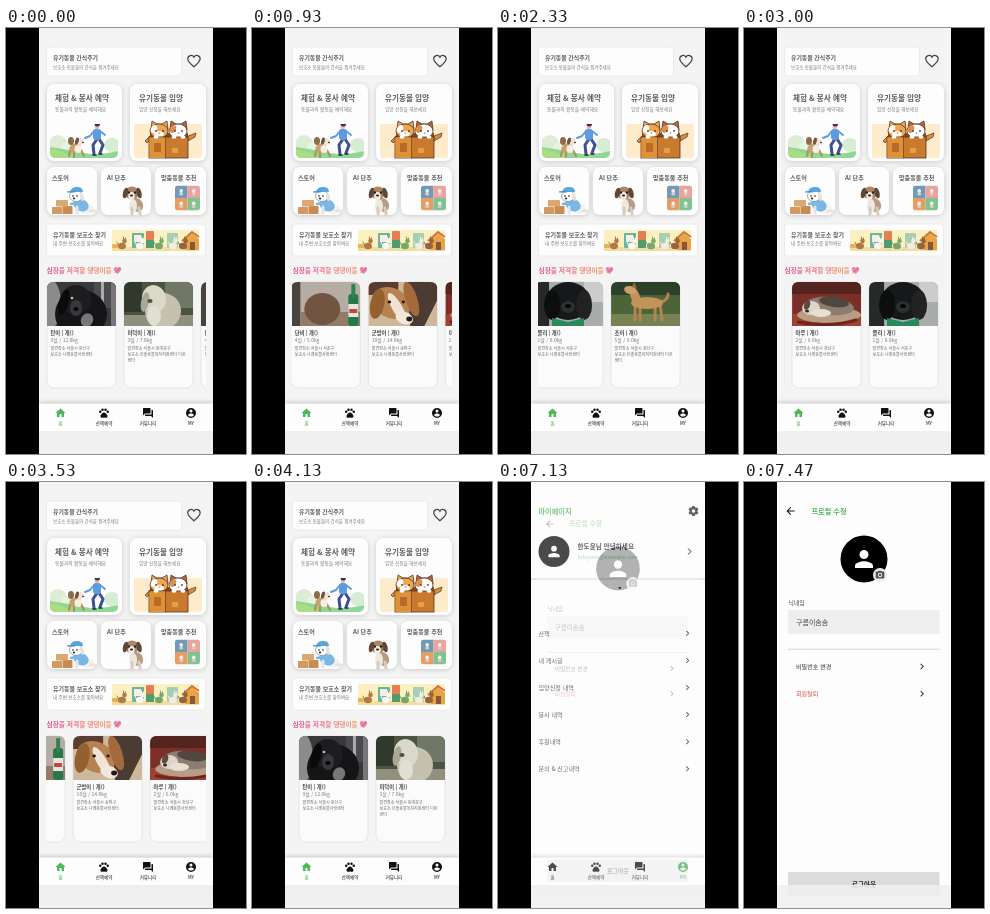
Write an HTML page that moves like this. It is 240 by 426 pixels and loops after 8000 ms.

```html
<!DOCTYPE html>
<html lang="ko">
<head>
<meta charset="utf-8">
<style>
  html, body { margin: 0; width: 100%; height: 100%; overflow: hidden; background: #000; }
  svg { display: block; width: 100%; height: 100%; }
  text { font-family: "Noto Sans CJK KR", "Noto Sans CJK", "Noto Sans", sans-serif; white-space: pre; }
  .card { fill: #fdfdfd; filter: drop-shadow(0 1px 2.5px rgba(0,0,0,.17)); }
  .field { fill: #fdfdfd; stroke: #e6e6e6; stroke-width: .7; }
</style>
</head>
<body>
<svg id="stage" viewBox="0 0 240 426"></svg>
<script>
const GREEN = '#4db85a', INK = '#333', SOFT = '#5c5c5c', PALE = '#7c7c7c';

const text = (x, y, size, str, fill = INK, weight = 400, anchor = 'start') =>
  `<text x="${x}" y="${y}" font-size="${size}" fill="${fill}" font-weight="${weight}" text-anchor="${anchor}">${str}</text>`;
const rect = (x, y, w, h, fill, r = 0, extra = '') =>
  `<rect x="${x}" y="${y}" width="${w}" height="${h}" rx="${r}" fill="${fill}" ${extra}/>`;
const oval = (x, y, rx, ry, fill, turn = 0) =>
  `<ellipse cx="${x}" cy="${y}" rx="${rx}" ry="${ry}" fill="${fill}" transform="rotate(${turn} ${x} ${y})"/>`;
const path = (d, fill, extra = '') => `<path d="${d}" fill="${fill}" ${extra}/>`;
const line = (d, color, width) => path(d, 'none', `stroke="${color}" stroke-width="${width}" stroke-linecap="round" stroke-linejoin="round"`);
const panel = (x, y, w, h, r, kind = 'card') => rect(x, y, w, h, '#fff', r, `class="${kind}"`);
const group = (body, extra = '') => `<g ${extra}>${body}</g>`;
const icon = (name, cx, cy, size, fill) =>
  path(ICONS[name], fill, `transform="translate(${cx - size / 2} ${cy - size / 2}) scale(${size / 24})"`);

// 24-unit icon outlines
const dot = (x, y, r) => `M${x - r} ${y}a${r} ${r} 0 1 0 ${2 * r} 0a${r} ${r} 0 1 0 ${-2 * r} 0z`;
const ICONS = {
  home: 'M10 20v-6h4v6h5v-8h3L12 3 2 12h3v8z',
  paw: dot(4.5, 9.5, 2.5) + dot(9, 5.5, 2.5) + dot(15, 5.5, 2.5) + dot(19.5, 9.5, 2.5) +
    'M12 11c-3 0-7 5-7 7.5c0 3 3 3.5 7 2.5c4 1 7 .5 7-2.5c0-2.5-4-7.5-7-7.5z',
  chat: 'M21 6h-2v9H6v2c0 .55.45 1 1 1h11l4 4V7c0-.55-.45-1-1-1zM17 12V3c0-.55-.45-1-1-1H3c-.55 0-1 .45-1 1v14l4-4h10c.55 0 1-.45 1-1z',
  account: 'M12 2a10 10 0 1 0 0 20 10 10 0 0 0 0-20zm0 3a3 3 0 1 1 0 6 3 3 0 0 1 0-6zm0 14.2c-2.5 0-4.71-1.28-6-3.22.03-1.99 4-3.08 6-3.08s5.97 1.09 6 3.08c-1.29 1.94-3.5 3.22-6 3.22z',
  person: 'M12 12a4 4 0 1 0 0-8 4 4 0 0 0 0 8zm0 2c-2.67 0-8 1.34-8 4v2h16v-2c0-2.66-5.33-4-8-4z',
  next: 'M10 6 8.59 7.41 13.17 12l-4.58 4.59L10 18l6-6z',
  back: 'M20 11H7.83l5.59-5.59L12 4l-8 8 8 8 1.41-1.41L7.83 13H20z',
  camera: 'M9 2 7.17 4H4c-1.1 0-2 .9-2 2v12c0 1.1.9 2 2 2h16c1.1 0 2-.9 2-2V6c0-1.1-.9-2-2-2h-3.17L15 2zm3 15a5 5 0 1 1 0-10 5 5 0 0 1 0 10zm0-2a3 3 0 1 0 0-6 3 3 0 0 0 0 6z',
  heart: 'M12 21C5 15 2 12 2 8a5.3 5.3 0 0 1 10-2.5A5.3 5.3 0 0 1 22 8c0 4-3 7-10 13z'
};

function gear(cx, cy) {
  const teeth = [0, 60, 120].map(a => rect(cx - 1.4, cy - 5, 2.8, 10, '#222', .5, `transform="rotate(${a} ${cx} ${cy})"`));
  return teeth.join('') + oval(cx, cy, 3.9, 3.9, '#222') + oval(cx, cy, 1.7, 1.7, '#fdfdfd');
}

function nav(active) {
  const tabs = [['home', '홈', 54.5], ['paw', '산책예약', 98], ['chat', '커뮤니티', 142], ['account', 'MY', 185]];
  return rect(33, 375.5, 174, 28, '#fdfdfd', 0, 'style="filter:drop-shadow(0 -1px 2px rgba(0,0,0,.2))"') +
    tabs.map(([name, label, x], i) => {
      const color = i === active ? GREEN : '#111';
      return icon(name, x, 385, 12, color) + text(x, 397, i === active ? 5 : 4.5, label, color, 500, 'middle');
    }).join('');
}

const walkArt = () =>
  rect(44, 96, 68, 34, '#fdfdfd') + oval(52, 116, 9, 9, '#dcedd4') + oval(62, 119, 7, 5, '#e8f3e0') +
  oval(106, 117, 8, 7, '#d6ecd3') + path('M44 119q20 3 34 6t34-2v8H44z', '#8fd893') + path('M44 121q14 2 24 9H44z', '#a9dd84') +
  line('M64 123l-1 5M68 124l0 5M75 122l3 6', '#b98a55', 2) + oval(69, 120, 6, 4.5, '#c8a06d', -25) + oval(72, 121, 3.5, 4, '#f4eee4') +
  oval(65, 113, 3, 4, '#8d6a48') + oval(74, 113.5, 4, 3.6, '#f0e5d2') + oval(71, 113, 1.8, 3.5, '#74553c', 15) + oval(77, 114.5, 1, .8, INK) +
  line('M91 111l-4 6 1 9M93 111l4 6-3 8', '#3f4f96', 3) + line('M87 127h3M93 126h3', '#2f2f55', 1.6) +
  rect(87, 101, 8, 11, '#5b9be0', 3) + line('M88 103l-4 5-5 2M94 103l5 4', '#5b9be0', 2) +
  oval(91, 98.5, 2.3, 2.6, '#efb493') + oval(91.3, 96.8, 2.7, 1.7, '#3a3350');

const cat = (x, y, coat, ear, patch) =>
  path(`M${x - 8} ${y}l1-9 5 3h5l5-3 1 9z`, ear, 'stroke="#51352c" stroke-width=".8"') +
  `<ellipse cx="${x}" cy="${y + 1}" rx="9" ry="7" fill="${coat}" stroke="#51352c" stroke-width=".8"/>` +
  oval(x - 5, y - 1, 3, 4, patch, 25) + oval(x, y + 4, 5, 3, '#fff') +
  oval(x - 3, y + 1, .8, 1, '#41291f') + oval(x + 4, y + 1, .8, 1, '#41291f') + oval(x + .5, y + 3, 1, .7, '#d87a78');

const adoptArt = () =>
  rect(128, 96, 68, 34, '#fdebcb', 3) + rect(144, 105, 38, 8, '#7d4a22') +
  cat(153, 102, '#f3a54d', '#f3a54d', '#fff') + cat(172, 102, '#fff', '#b3683a', '#dc8e4c') +
  path('M144 108l-5 5 2 2 3-3zM182 108l8-3-1 4-7 4z', '#d98d3b', 'stroke="#54342a" stroke-width=".7"') +
  rect(143, 109, 39, 21, '#c97a2d', 0, 'stroke="#54342a" stroke-width=".8"') + rect(143.4, 109.4, 16, 20.6, '#dd9238') +
  rect(148, 115, 7, 9, '#b96a2a', 1) + rect(166, 120, 6, 5, '#e2a04b', 1) + line('M159.5 109v21', '#54342a', .6) +
  oval(150, 109, 2.5, 1.8, '#fff') + oval(168, 109, 2.5, 1.8, '#fff') + oval(177, 109, 2.5, 1.8, '#fff');

const storeArt = () =>
  oval(81, 181, 7, 5, '#f5f2ee') + oval(75, 177, 8, 6, '#79b8e6', 25) + line('M71 179v6M84 183h5', '#e8e4df', 3) +
  `<ellipse cx="70" cy="168" rx="6.5" ry="5.5" fill="#fff" stroke="#77706c" stroke-width=".6"/>` +
  oval(76, 169, 1.8, 4, '#e6e1da', -12) + path('M64 164q1-5 7-5t6 5z', '#5aa5dc') + rect(61, 163.2, 8, 1.4, '#3f86bd', .7) +
  oval(67, 168, .7, .9, INK) + oval(71, 168, .7, .9, INK) + oval(68, 170.5, 1.2, .9, INK) +
  rect(46, 179, 10, 7, '#d29a62', .6) + rect(56.5, 178, 10, 8, '#c98b50', .6) + rect(50, 172, 12, 6.6, '#dba873', .6) +
  line('M65 176l5-1', '#79b8e6', 2.5);

const puppyArt = () =>
  oval(131, 177, 6, 7, '#b59c85', -20) + oval(127, 178, 4, 7, '#efe8df') + line('M126 180v6M133 180l1 6', '#d9cbbb', 3) +
  oval(126, 165, 7, 6.5, '#a98767') + oval(119.5, 165, 2.5, 5.5, '#5f4636', 15) + oval(133, 165, 2.5, 5.5, '#5f4636', -15) +
  oval(125.5, 168, 3.2, 4, '#f3ece3') + oval(123, 164.5, 1, 1.2, '#211812') + oval(129, 164.5, 1, 1.2, '#211812') + oval(125.5, 167.5, 1.5, 1.1, '#211812');

const tilesArt = () => group(['#7199b8', '#eaa49f', '#e59d63', '#80c290'].map((fill, i) => {
  const x = 169 + i % 2 * 12.5, y = 157.5 + (i >> 1) * 12.5;
  return rect(x, y, 12.5, 12.5, fill) + oval(x + 6.2, y + 5.5, 1.8, 2, '#f4eee8') + oval(x + 6.2, y + 8.5, 2, 1.5, '#d8cfc7');
}).join(''), 'clip-path="url(#tiles)"');

const shelterArt = () =>
  rect(106, 202, 87, 21, '#fdf0c0') + rect(106, 219, 87, 4, '#f2dca0') +
  [[106, 216, 6, '#e6b456'], [126, 205, 12, '#69b5a5'], [140, 203, 8, '#e37f52'], [140, 212, 8, '#4f9c70'], [161, 205, 11, '#a4cfb4']]
    .map(([x, y, w, fill]) => rect(x, y, w, 220 - y, fill, .8)).join('') + rect(128, 207, 7, 7, '#f5f0df') +
  path('M178 213l8-8 7 6v11h-14z', '#e9a545') + path('M176 213l10-9 7 5', 'none', 'stroke="#cf743b" stroke-width="2"') + rect(184, 214, 5, 8, '#86583a') +
  [[116, '#b07a48'], [134, '#fbf7ee'], [153, '#75a86b'], [167, '#f3eddf'], [177, '#94643f']]
    .map(([x, fill]) => oval(x, 218, 4, 3.2, fill) + oval(x + 2.5, 213, 2.3, 2.3, fill) + line(`M${x - 3} 218l-2-4M${x + 1.5} 212v-3M${x + 3.5} 212v-2`, fill, 1)).join('');

// Photo stand-ins, 69 x 44
const photos = {
  black: () => rect(0, 0, 69, 44, '#39393b') + oval(4, 22, 10, 24, '#8b8b8d') + rect(47, 0, 22, 26, '#4c4c4e') +
    rect(54, 0, 3, 30, '#aaaaac') + rect(64, 0, 5, 44, '#777779') + oval(34, 32, 26, 24, '#151517') +
    oval(29, 18, 15, 15, '#1d1d1f') + oval(17, 20, 5, 13, '#0a0a0b', 15) + oval(29, 26, 6, 8, '#38383b') +
    oval(29, 27, 2.6, 2, '#060607') + oval(40, 38, 6, 7, '#77777a', 25) + oval(25, 16, 1.4, 1.2, '#bbb'),
  shaggy: () => rect(0, 0, 69, 44, '#4b5342') + rect(41, 0, 28, 26, '#717766') + rect(0, 0, 18, 30, '#30392b') + rect(0, 33, 69, 11, '#918f7d') +
    oval(39, 29, 18, 18, '#c4c2ae', 18) + oval(30, 17, 12, 14, '#dad8c8', -10) + oval(21, 20, 4, 10, '#aaa894', 12) +
    oval(26, 19, 2.6, 2, '#514e49') + oval(30, 34, 7, 10, '#e1dfd1'),
  bottle: () => rect(0, 0, 69, 44, '#b5aca3') + rect(0, 0, 9, 44, '#48433f') + rect(9, 30, 60, 14, '#927b68') + oval(31, 27, 18, 16, '#715540') +
    rect(57, 12, 10, 32, '#26784a', 3) + rect(60, 2, 4, 14, '#31824f', 1) + rect(57, 22, 10, 13, '#e9e5dc') + rect(58, 27, 8, 4, '#c5473f'),
  beagle: () => rect(0, 0, 69, 44, '#cdb89b') + rect(0, 0, 30, 13, '#5a3d30') + path('M38 0h31v18l-13 26H42z', '#4b3b33') +
    oval(23, 21, 20, 15, '#b78250', 25) + oval(9, 22, 7, 15, '#94602f', 12) + oval(43, 17, 6, 18, '#a36a3c', -18) +
    oval(29, 26, 5, 17, '#efe4d4', -30) + oval(36, 36, 9, 6, '#f1e7da', 20) + oval(41, 37, 3, 2.4, '#241c1a') +
    oval(21, 20, 1.8, 1.4, '#241812') + oval(35, 20, 1.6, 1.4, '#241812'),
  lying: () => rect(0, 0, 69, 44, '#7c2e28') + rect(0, 0, 69, 12, '#54241f') + rect(0, 32, 69, 12, '#9c4331') + oval(37, 33, 32, 8, '#b79d83') +
    oval(38, 24, 24, 9, '#8c7d70', 6) + oval(42, 20, 15, 5, '#514741', 8) + oval(19, 26, 9, 7, '#ded4c8') +
    oval(29, 31, 10, 4, '#e8dfd3') + oval(15, 23, 3, 5, '#5b4a40', 20) + oval(15, 29, 2, 1.5, '#2c2625') + line('M6 40q31 6 58-2', '#6f241f', 3),
  poodle: () => rect(0, 0, 69, 44, '#a8ada9') + rect(0, 0, 15, 44, '#252927') + rect(50, 0, 19, 20, '#cccdca') +
    oval(34, 19, 22, 19, '#171819') + oval(18, 23, 8, 15, '#0d0e0f') + oval(50, 23, 8, 15, '#202224') +
    oval(34, 25, 7, 6, '#2c2e30') + oval(34, 24, 3, 2, '#050505') + path('M18 36l16 4 16-4v8H18z', '#28895a'),
  tan: () => rect(0, 0, 69, 44, '#4b6438') + rect(0, 0, 69, 13, '#2d402a') + rect(0, 32, 69, 12, '#788154') +
    line('M24 24v14M29 25v13M44 25v13M49 22l2 16M50 20q7-2 7-8', '#b5844f', 3) + oval(36, 21, 16, 6, '#c39359') +
    oval(24, 14, 4.5, 9, '#c39359', -20) + oval(19, 8, 6, 4, '#cda069', 12) + path('M21 5l2-5 3 7z', '#9c6c3c')
};

const SHELTER = '보호소 나래동물사랑센터';
const WELFARE = ['보호소 은솔동물복지지원센터 다온', '센터'];
const dogs = [
  ['black', '탄이', '9살 / 12.0kg', '용산구', SHELTER],
  ['shaggy', '미덕이', '3살 / 7.0kg', '동대문구', ...WELFARE],
  ['bottle', '단비', '4살 / 5.0kg', '서초구', SHELTER],
  ['beagle', '군밤이', '10살 / 14.0kg', '송파구', SHELTER],
  ['lying', '마루', '2살 / 6.0kg', '강남구', SHELTER],
  ['poodle', '쫄리', '1살 / 8.0kg', '서초구', SHELTER],
  ['tan', '조이', '5살 / 9.0kg', '용산구', ...WELFARE]
];

const dogCard = ([photo, name, facts, place, shelter, rest = ''], i) => group(
  rect(0, 0, 69, 106, '#fbfbfb', 7, 'stroke="#dedede" stroke-width=".7"') +
  group(photos[photo](), 'clip-path="url(#photo)"') +
  text(3.5, 53.3, 5.3, `${name} | 개()`, '#444', 600) + text(3.5, 60.3, 5, facts, PALE) +
  [`발견장소 서울시 ${place}`, shelter, rest].map((row, n) => text(3.5, 67.5 + 6.4 * n, 4.05, row, '#666')).join(''),
  `transform="translate(${41 + 77 * i} 254)"`);

const homePage = () =>
  rect(33, 0, 174, 426, '#f4f4f4') +
  panel(40.5, 19, 135, 29, 3, 'field') + text(47, 31.6, 5.9, '유기동물 간식주기', SOFT, 600) + text(47, 40.6, 4.5, '보호소 동물들의 간식을 챙겨주세요', PALE) +
  path(ICONS.heart, 'none', 'stroke="#444" stroke-width="2" transform="translate(180.5 25.8) scale(.62)"') +
  panel(41, 56, 75, 77, 7) + text(49, 73, 7.6, '체험 &amp; 봉사 예약', SOFT, 600) + text(49, 83, 4.8, '동물과의 활동을 예약해요', PALE) +
  group(walkArt(), 'clip-path="url(#walk)"') +
  panel(124, 56, 76, 77, 7) + text(133, 73, 7.6, '유기동물 입양', SOFT, 600) + text(133, 83, 4.7, '입양 신청을 해보세요', PALE) + adoptArt() +
  [[41, 50, 46, '스토어'], [95, 50, 101, 'AI 단추'], [149, 51, 155, '맞춤동물 추천']]
    .map(([x, w, tx, label]) => panel(x, 139, w, 48, 7) + text(tx, 152, 6.1, label, SOFT, 600)).join('') +
  storeArt() + puppyArt() + tilesArt() +
  panel(40.5, 196, 159, 32, 3, 'field') + text(47, 208.6, 6, '유기동물 보호소 찾기', SOFT, 600) + text(47, 217.2, 4.6, '내 주변 보호소를 찾아봐요', PALE) + shelterArt() +
  text(40.5, 245, 6.7, '심장을 저격할 댕댕이들', 'url(#title)', 600) +
  icon('heart', 111.5, 242.5, 9, '#ee86a6') + line('M109 244.500l5-4', '#b06a92', .9) +
  group(group(dogs.map(dogCard).join(''), 'id="strip"'), 'clip-path="url(#list)"') + nav(0);

const myPage = () =>
  rect(33, 0, 174, 426, '#fdfdfd') + text(40.5, 31.5, 7.2, '마이페이지', GREEN, 700) + gear(195.5, 29) +
  oval(56, 69.5, 15.5, 15.5, '#000') + icon('person', 56, 69.5, 17, '#fff') +
  text(79.5, 66.5, 6.6, '한도윤님 안녕하세요', '#222', 700) + text(79.5, 77, 5.3, 'hdoyoon@example.com', '#8fd39b') +
  icon('next', 191.5, 69.5, 14, '#555') + rect(33, 96.5, 174, 1, '#ccc') + rect(120.5, 105, 2.5, 1.8, '#333', .8) +
  ['산책', '내 게시글', '입양신청 내역', '봉사 내역', '후원내역', '문의 &amp; 신고내역'].map((label, i) =>
    text(40.5, 153.5 + 27.1 * i, 6.1, label, INK, 500) + icon('next', 189.5, 151.3 + 27.1 * i, 11, '#222')).join('') + nav(3);

const profilePage = () =>
  rect(33, 0, 174, 426, '#fdfdfd') + icon('back', 46.5, 29, 12, '#111') + text(67.5, 31.5, 7.2, '프로필 수정', GREEN, 600) +
  oval(120, 77, 23.5, 23.5, '#000') + icon('person', 120, 77, 27, '#fff') +
  oval(136, 93, 7, 7, '#f0f0f0') + icon('camera', 136, 93, 10.5, '#555') +
  text(44.5, 122.5, 5.9, '닉네임', '#444') + rect(44, 128, 151.5, 24, '#eee') + text(52, 142.6, 7, '구름이솜솜', '#444') +
  rect(44, 166.7, 151.5, .9, '#ccc') +
  text(52, 187, 6.1, '비밀번호 변경', INK, 500) + icon('next', 178, 184.5, 12, '#333') +
  text(52, 214, 6.1, '회원탈퇴', '#dc4c4c', 500) + icon('next', 178, 211.7, 12, '#333') +
  rect(44, 390, 151.5, 24, '#dcdcdc', 1) + text(120, 404.5, 6.5, '로그아웃', '#222', 600, 'middle');

const clip = (id, x, y, w, h, r = 0) => `<clipPath id="${id}">${rect(x, y, w, h, '#000', r)}</clipPath>`;
document.getElementById('stage').innerHTML =
  `<defs>${clip('phone', 33, 0, 174, 426)}${clip('list', 40, 250, 160, 115)}${clip('walk', 44, 96, 68, 34, 5)}${clip('tiles', 169, 157.5, 25, 25, 3)}
  <clipPath id="photo"><path d="M0 44V7q0-7 7-7h55q7 0 7 7v37z"/></clipPath>
  <linearGradient id="title"><stop stop-color="#e84f98"/><stop offset="1" stop-color="#f2a070"/></linearGradient></defs>` +
  rect(0, 0, 240, 426, '#000') +
  group(group(homePage(), 'id="home"') + group(myPage(), 'id="my"') + group(profilePage(), 'id="profile"') +
    rect(33, 403, 174, 23, '#efefef', 0, 'opacity=".88"'), 'clip-path="url(#phone)"');

const [strip, home, my, profile] = ['strip', 'home', 'my', 'profile'].map(id => document.getElementById(id));
const easeOut = u => 1 - (1 - u) ** 2;

// Swipes through the list and back: [time, scroll offset]
const swipes = [[0, 0], [60, 0], [600, 120], [790, 120], [1550, 226], [1600, 229], [2150, 398], [2330, 390],
  [2850, 372], [3400, 222], [3530, 206], [3930, -18], [4130, -6], [4600, 0]];
function scrollAt(t) {
  const i = swipes.findIndex(([time]) => time > t);
  if (i < 0) return 0;
  const [[t0, x0], [t1, x1]] = [swipes[i - 1], swipes[i]];
  return x0 + (x1 - x0) * easeOut((t - t0) / (t1 - t0));
}

function draw() {
  const t = performance.now() % 8000;
  const push = easeOut(Math.min(1, Math.max(0, (t - 7070) / 390)));
  const zoom = .9 + .1 * push;
  strip.setAttribute('transform', `translate(${-scrollAt(t)} 0)`);
  home.style.display = t < 4870 ? '' : 'none';
  my.style.display = t >= 4870 && push < 1 ? '' : 'none';
  profile.style.display = push ? '' : 'none';
  profile.setAttribute('opacity', push);
  profile.setAttribute('transform', `translate(${120 * (1 - zoom)} ${213 * (1 - zoom)}) scale(${zoom})`);
  requestAnimationFrame(draw);
}
draw();
</script>
</body>
</html>
```
